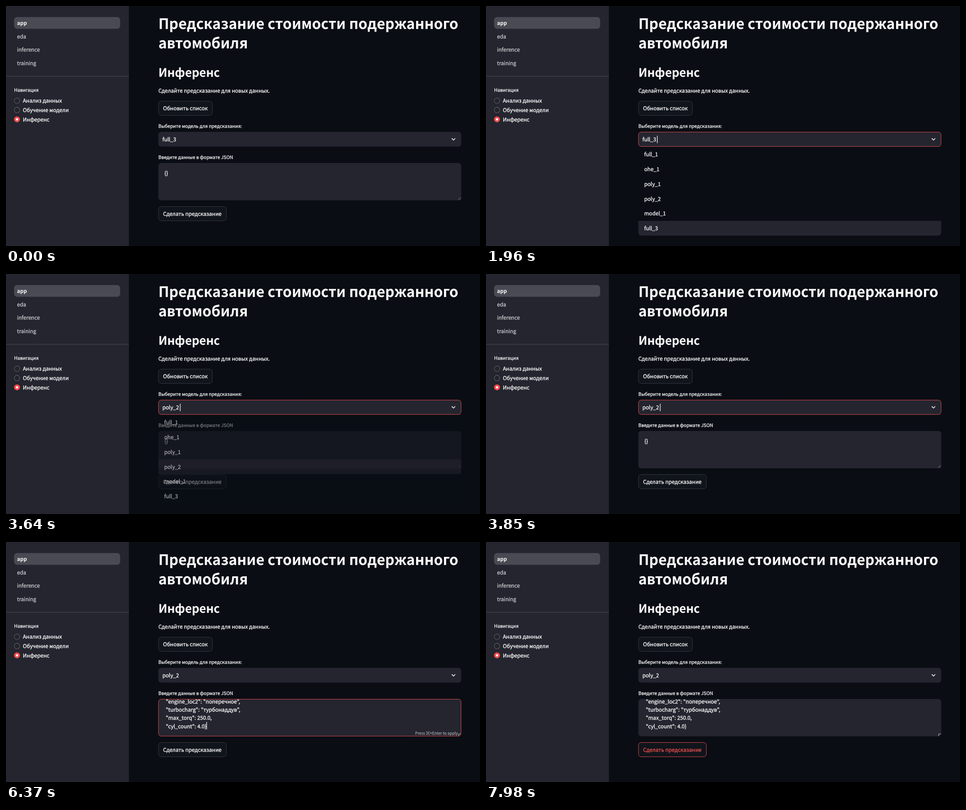
An HTML page with a canvas that plays this animation: 1053x532 px, repeating every 8000 ms.

```html
<!DOCTYPE html>
<html lang="ru">
<head>
<meta charset="utf-8">
<title>Инференс</title>
<style>
  html, body { margin: 0; width: 100%; height: 100%; overflow: hidden; background: #0a0d14; }
  canvas { display: block; width: 1053px; height: 532px; }
</style>
</head>
<body>
<canvas id="stage"></canvas>
<script>
const W = 1053, H = 532, LOOP = 8000, TICK = 70;
const canvas = document.getElementById('stage');
const ctx = canvas.getContext('2d');
const dpr = window.devicePixelRatio || 1;
canvas.width = W * dpr;
canvas.height = H * dpr;

const FAMILY = '"Noto Sans CJK JP", "Noto Sans CJK SC", "Noto Sans CJK KR", "Noto Sans", sans-serif';
const BG = '#0a0d14', PANEL = '#24252f', TEXT = '#fafafa', MUTED = '#c3c4c8', RED = '#ee4f4c';
const BODY = 11.7, SMALL = 10.25, TITLE = 32.1;
const LEFT = 338.4, WIDE = 672.9, ROW = 32.75;
const OPTIONS = ['full_1', 'ohe_1', 'poly_1', 'poly_2', 'model_1', 'full_3'];
const JSON_TAIL = ['"engine_loc2": "поперечное",', '"turbocharg": "турбонаддув",',
  '"max_torq": 250.0,', '"cyl_count": 4.0}'];

const clamp = v => Math.max(0, Math.min(1, v));
// Progress over n ticks, the first tick already counted
const ramp = (t, start, n) => clamp(((t - start) / TICK + 1) / n);
const easeOut = p => 1 - (1 - p) * (1 - p);

function text(str, x, y, size = BODY, color = TEXT, weight = 400, spacing = 0) {
  ctx.font = `${weight} ${size}px ${FAMILY}`;
  ctx.letterSpacing = spacing + 'px';
  ctx.fillStyle = color;
  ctx.fillText(str, x, y);
  if (weight > 400) return;
  // Slight emboldening, like desktop font smoothing
  ctx.strokeStyle = color;
  ctx.lineWidth = size * .03;
  ctx.strokeText(str, x, y);
}

function box(x, y, w, h, fill, stroke, radius = 6.5) {
  ctx.beginPath();
  ctx.roundRect(x, y, w, h, radius);
  if (fill) {
    ctx.fillStyle = fill;
    ctx.fill();
  }
  if (stroke) {
    ctx.beginPath();
    ctx.roundRect(x + .45, y + .45, w - .9, h - .9, radius - .45);
    ctx.strokeStyle = stroke;
    ctx.lineWidth = .9;
    ctx.stroke();
  }
}

function line(points, color, width) {
  ctx.beginPath();
  points.forEach(([x, y]) => ctx.lineTo(x, y));
  ctx.strokeStyle = color;
  ctx.lineWidth = width;
  ctx.stroke();
}

function faded(alpha, draw) {
  if (alpha <= 0) return;
  ctx.save();
  ctx.globalAlpha = alpha;
  draw();
  ctx.restore();
}

function caret(x, y, alpha) {
  faded(alpha, () => {
    ctx.fillStyle = TEXT;
    ctx.fillRect(x, y, 1.3, 16.5);
  });
}

function radio(y, label, on) {
  ctx.beginPath();
  ctx.arc(24.5, y, 6.5, 0, Math.PI * 2);
  ctx.fillStyle = on ? '#fb4d4c' : '#6a6b72';
  ctx.fill();
  ctx.beginPath();
  ctx.arc(24.5, y, on ? 2.5 : 5.6, 0, Math.PI * 2);
  ctx.fillStyle = on ? '#fff' : '#22232c';
  ctx.fill();
  text(label, 37.5, y + 4.3);
}

function sidebar() {
  ctx.fillStyle = PANEL;
  ctx.fillRect(0, 0, 273, H);
  box(18, 24.5, 235.5, 26, '#494a53');
  text('app', 24.5, 42.2, BODY, TEXT, 700);
  ['eda', 'inference', 'training'].forEach((s, i) => text(s, 24.5, 71.8 + i * 29.4, BODY, MUTED));
  ctx.fillStyle = '#4f5058';
  ctx.fillRect(0, 155.4, 273, .9);
  text('Навигация', 18, 190, SMALL);
  ['Анализ данных', 'Обучение модели', 'Инференс'].forEach((s, i) => radio(210 + i * 20.6, s, i === 2));
}

function heading() {
  text('Предсказание стоимости подержанного', LEFT, 51, TITLE, TEXT, 700);
  text('автомобиля', LEFT, 93.7, TITLE, TEXT, 700);
  text('Инференс', LEFT, 156.7, 26.16, TEXT, 700, -.17);
  text('Сделайте предсказание для новых данных.', LEFT, 191.5);
}

function button(label, y, w, state) {
  const red = state !== 'idle';
  box(LEFT, y, w, 32.5, state === 'down' ? RED : '#10141b', red ? RED : '#3b3e44');
  text(label, 349, y + 20.6, BODY, state === 'hover' ? RED : TEXT);
}

function select(t) {
  const focus = easeOut(ramp(t, 1890, 2)) * (1 - easeOut(ramp(t, 4900, 4)));
  const picked = t >= 3640;
  text('Выберите модель для предсказания:', LEFT, 270, SMALL);
  box(LEFT, 279, WIDE, 32.8, PANEL);
  faded(focus, () => box(LEFT, 279, WIDE, 32.8, null, RED));
  text(picked ? 'poly_2' : 'full_3', 347.5, 300);
  line([[990.2, 293.4], [994, 297.3], [997.8, 293.4]], TEXT, 1.6);
  if (t < 1890) return;
  if (picked) caret(386.4, 287.5, 1 - ramp(t, 4480, 3));
  else caret(379.9, 287.5, t < 2940 ? 1 - ramp(t, 2520, 3) : ramp(t, 2940, 3));
}

function textarea(t) {
  const filled = t >= 6370;
  const focus = easeOut(ramp(t, 4900, 5)) * (1 - easeOut(ramp(t, 7840, 3)));
  text('Введите данные в формате JSON', LEFT, 339, SMALL);
  box(LEFT, 348, WIDE, 82.7, PANEL);

  if (filled) {
    ctx.save();
    ctx.beginPath();
    ctx.rect(LEFT, 349, WIDE, 80.5);
    ctx.clip();
    JSON_TAIL.forEach((s, i) => text(s, 355, 358.2 + i * 18.1));
    ctx.restore();
  } else {
    if (t >= 4970) {
      ctx.fillStyle = '#48667b';
      ctx.fillRect(352, 363, 8, 15.5);
    }
    text('{}', 352, 375.4);
  }

  faded(focus, () => box(LEFT, 348, WIDE, 82.7, null, RED));
  if (filled) {
    if (t < 7840) {
      text('Press ⌘+Enter to apply', 909, 426.5, 8.78, '#a2a3a8');
      caret(445, 399, t < 7350 ? 1 - ramp(t, 6930, 3) : ramp(t, 7350, 3));
    }
    line([[1005.7, 430], [1005.7, 425.5], [1010.5, 425.5]], '#b5b6ba', 1.2);
  } else {
    line([[1004.5, 429.8], [1010.3, 424]], '#8d8e94', .9);
    line([[1007.8, 429.8], [1010.3, 427.3]], '#8d8e94', .9);
  }
}

function hovered(t) {
  if (t < 2520) return 5;
  if (t < 2590) return 0;
  if (t < 2660) return 1;
  return t < 3360 ? 2 : 3;
}

function menu(t) {
  const alpha = clamp(ramp(t, 1890, 4) * 2) * (1 - easeOut(ramp(t, 3640, 4)));
  faded(alpha, () => {
    ctx.fillStyle = BG;
    ctx.fillRect(337, 312, 676, 198);
    const i = hovered(t);
    box(LEFT, 312.5 + i * ROW, WIDE, ROW, PANEL, null, i === 5 ? [0, 0, 6.5, 6.5] : 0);
    OPTIONS.forEach((s, n) => text(s, 351.5, 333.3 + n * ROW));
  });
}

function draw(t) {
  ctx.setTransform(dpr, 0, 0, dpr, 0, 0);
  ctx.textRendering = 'geometricPrecision';
  ctx.lineJoin = 'round';
  ctx.fillStyle = BG;
  ctx.fillRect(0, 0, W, H);
  sidebar();
  heading();
  button('Обновить список', 210.5, 120.5, 'idle');
  select(t);
  textarea(t);
  const pressed = t >= 7840 && t < 7910;
  button('Сделать предсказание', 444, 151.5, pressed ? 'down' : t >= 7280 ? 'hover' : 'idle');
  menu(t);
}

const start = performance.now();
function frame() {
  const t = (performance.now() - start) % LOOP;
  draw(Math.floor(t / TICK) * TICK);
  requestAnimationFrame(frame);
}
frame();
</script>
</body>
</html>
```
